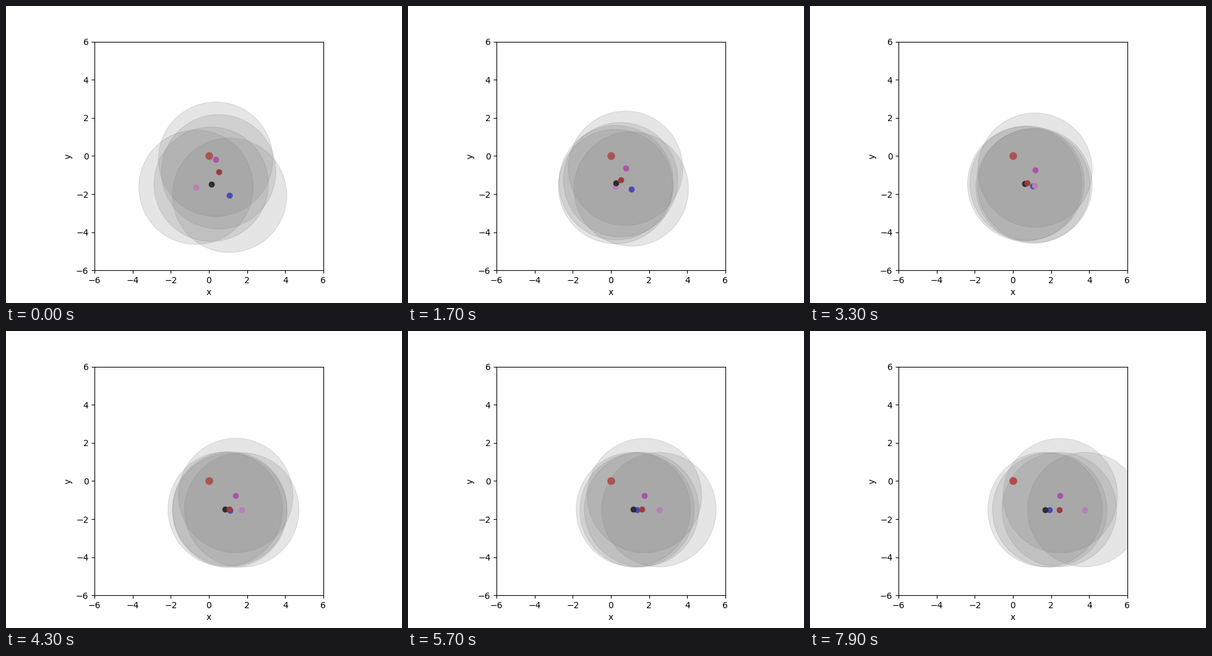
A matplotlib script that plays this animation: 640x480 px, repeating every 8 s.

```python
import numpy as np
import matplotlib.pyplot as plt
from matplotlib.animation import FuncAnimation
from matplotlib.patches import Circle

FRAMES, INTERVAL = 80, 100
SENSE_RADIUS = 3
SOFTNESS = 0.4


def drift(start, v0, v1, turn):
    """Move at speed v0, changing softly to v1 around the time turn."""
    ramp = lambda t: SOFTNESS * np.logaddexp(0, (t - turn) / SOFTNESS)
    return lambda t: start + v0 * t + (v1 - v0) * ramp(t)


def settle(rest, offset, kick):
    """Come to rest as a damped spring does."""
    return lambda t: rest + (offset + kick * t) * np.exp(-t)


AGENTS = [
    ("magenta", drift(0.35, 0.245, 0.36, 6.2), settle(-0.77, 0.60, 0.05)),
    ("blue", drift(1.08, -0.01, 0.255, 4.4), settle(-1.52, -0.54, -0.36)),
    ("violet", drift(-0.68, 0.52, 0.57, 1.0), settle(-1.50, -0.14, -0.25)),
    ("black", drift(0.11, 0.0, 0.232, 1.1), settle(-1.50, 0.02, 0.31)),
    ("brown", drift(0.51, -0.01, 0.375, 2.7), settle(-1.50, 0.67, 0.43)),
]

fig, ax = plt.subplots(figsize=(6.4, 4.8), dpi=100)
ax.set(xlim=(-6, 6), ylim=(-6, 6), xlabel="x", ylabel="y", aspect="equal")
ax.set_xticks(range(-6, 7, 2))
ax.set_yticks(range(-6, 7, 2))

ax.plot(0, 0, "o", color="red", markersize=8, zorder=1)
swarm = []
for n, (color, x, y) in enumerate(AGENTS):
    z = 1.1 + n / 10
    dot, = ax.plot([], [], "o", color=color, markersize=6, zorder=z)
    disc = ax.add_patch(Circle((0, 0), SENSE_RADIUS, color="gray",
                               alpha=0.2, zorder=z + 0.05))
    swarm.append((x, y, dot, disc))


def update(frame):
    t = frame * INTERVAL / 1000
    for x, y, dot, disc in swarm:
        disc.center = x(t), y(t)
        dot.set_data([x(t)], [y(t)])
    return [artist for *_, dot, disc in swarm for artist in (dot, disc)]


anim = FuncAnimation(fig, update, frames=FRAMES, interval=INTERVAL, repeat=True)
plt.show()
```
